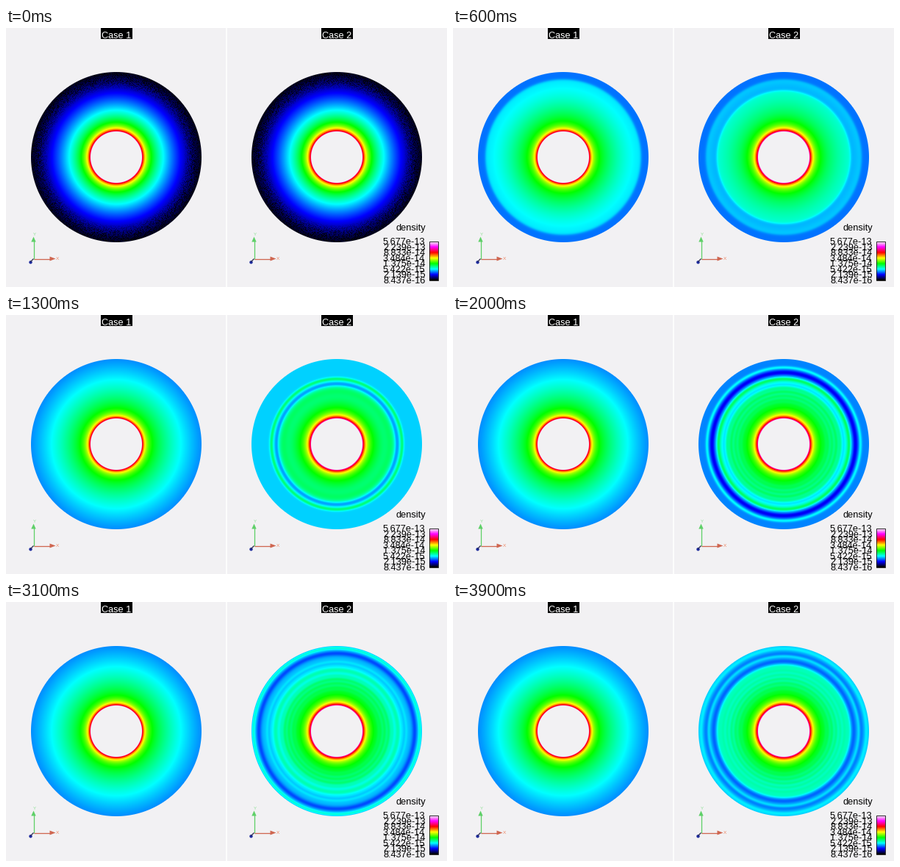
A matplotlib script that plays this animation: 600x353 px, repeating every 4000 ms.

```python
import numpy as np
import matplotlib.pyplot as plt
from matplotlib.animation import FuncAnimation
from matplotlib.patches import Circle, Polygon, Rectangle

W, H, DPI = 600, 353, 100
FRAMES, INTERVAL = 40, 100
R_IN, R_OUT, CY = 35, 116, 176
BG = np.array([242, 241, 243]) / 255

# Colour scale: black, blue, cyan, green, yellow, red, magenta, white
SCALE = np.array([[0, 0, 0], [0, 0, 1], [0, 1, 1], [0, 1, 0],
                  [1, 1, 0], [1, 0, 0], [1, 0, 1], [1, 1, 1]], float)

# Pulses of the second case: frame of passing PULSE_R, depth
PULSES = [(13, 0.6), (20, 0.4), (28.5, 0.2), (33, 0.35)]
PULSE_R, PULSE_SPEED = 82, 2.2


def colour(v):
    return np.stack([np.interp(v, range(8), SCALE[:, c]) for c in range(3)], -1)


def ramp(x, start, end):
    return np.clip((x - start) / (end - start), 0, 1)


def bump(r, centre, width):
    return np.exp(-((r - centre) / width) ** 2)


def inside(r, edge, width=1.0):
    return 1 / (1 + np.exp(np.clip((r - edge) / width, -50, 50)))


# Levels on the colour scale as functions of radius and frame
def power_law(r, rim, slope, peak, width=4.0):
    """Falls with log radius, plus a steep rise at the inner edge."""
    return (rim + slope * np.log(R_OUT / r)
            + peak * np.exp(-np.maximum(r - R_IN, 0) / width))


def steady_wind(r, t):
    return power_law(r, 1.55, 1.63, 2.0)


def pulsed_wind(r, t):
    wind = power_law(r, 1.55, 1.63, 2.3, 4.4) + 0.12 * ramp(r, 60, 88)
    rim = np.interp(t, [6, 13, 20, 39], [1.6, 1.82, 1.52, 1.65])
    v = rim + (wind - rim) * inside(r, 91)
    v += 0.07 * np.sin((r - 1.5 * t) * 1.1) * bump(r, 70, 14) * ramp(t, 13, 20)
    for passing, depth in PULSES:
        dip = PULSE_R + PULSE_SPEED * (t - passing)
        strength = depth * ramp(dip, 70, PULSE_R)
        v += strength * (0.4 * bump(r, dip - 9, 6) - bump(r, dip, 3.5)
                         + 0.8 * bump(r, dip + 7, 2.2))
    return v


def field(wind, r, t):
    """The wind sweeps outward through the initial state."""
    start = power_law(r, 0.1, 3.2, 1.6)
    ahead = start + (1.45 - start) * ramp(t, 0, 6)
    front = R_IN + 11.8 * t
    pile = 0.28 * ramp(t, 11, 5) * np.exp(-np.maximum(front - r, 0) / 15)
    return ahead + (wind(r, t) + pile - ahead) * inside(r, front) * (t > 0)


# Pixel grid around one disc
HALF = 120
axis = np.arange(-HALF, HALF) + 0.5
rad = np.hypot(*np.meshgrid(axis, axis))
cover = (np.clip(R_OUT - rad + 0.5, 0, 1)
         * np.clip(rad - R_IN + 0.5, 0, 1))[..., None]
speckle = np.random.default_rng(4).random(rad.shape) < 0.4
speckle = speckle * ramp(rad, 92, 106)


def disc(wind, t):
    v = field(wind, rad, t) * (1 - 0.75 * speckle * ramp(t, 3, 0))
    return colour(v) * cover + BG * (1 - cover)


fig = plt.figure(figsize=(W / DPI, H / DPI), dpi=DPI, facecolor=BG)
ax = fig.add_axes([0, 0, 1, 1])
ax.axis("off")


def px(n):
    return n * 72 / DPI


def text(x, y, s, size, color="black", **kw):
    ax.text(x, y, s, fontsize=px(size), color=color,
            family="Liberation Sans", **kw)


def line(xs, ys, color, width):
    ax.plot(xs, ys, color=color, lw=px(width), solid_capstyle="butt")


def triad(x, y):
    green, red = "#5fd068", "#cf6650"
    line([x, x], [y, y - 25], green, 1.3)
    ax.add_patch(Polygon([(x - 3.2, y - 23), (x + 3.2, y - 23), (x, y - 30)],
                         fc=green, lw=0))
    line([x, x + 23], [y, y], red, 1.3)
    ax.add_patch(Polygon([(x + 22, y - 3), (x + 22, y + 3), (x + 30, y)],
                         fc=red, lw=0))
    line([x, x - 4], [y, y + 4], "#303050", 1.3)
    ax.add_patch(Circle((x - 4, y + 4.8), 2.2, fc="#1c2a9c", lw=0))
    text(x + 1.5, y - 33, "Y", 6, "#8fe096", ha="center", va="center")
    text(x + 33, y, "X", 6.5, "#f08a68", ha="center", va="center")


WINDS = [steady_wind, pulsed_wind]
discs = []
for i, wind in enumerate(WINDS):
    cx = 150 + 300 * i
    extent = [cx - HALF, cx + HALF, CY + HALF, CY - HALF]
    discs.append(ax.imshow(disc(wind, 0), extent=extent,
                           interpolation="nearest"))
    ax.add_patch(Rectangle((cx - 21, 0), 43, 15, fc="black", lw=0))
    text(cx, 13.6, f"Case {i + 1}", 12.8, "white", ha="center")
    triad(cx - 112.5, 314.5)

line([300, 300], [0, H], "white", 1.6)

# Legend
ax.imshow(colour(np.linspace(7, 0, 106))[:, None], extent=[576, 588, 344, 291],
          interpolation="nearest")
ax.add_patch(Rectangle((576, 291), 12, 53, fill=False, ec="black", lw=px(0.8)))
text(530.6, 276, "density", 12.8)
for k, value in enumerate(np.geomspace(5.6767e-13, 8.437e-16, 8)):
    text(513, 295 + 7.57 * k, f"{value:.3e}", 12.8)

ax.set_aspect("auto")
ax.set_xlim(0, W)
ax.set_ylim(H, 0)


def update(frame):
    for im, wind in zip(discs, WINDS):
        im.set_data(disc(wind, frame))
    return discs


anim = FuncAnimation(fig, update, frames=FRAMES, interval=INTERVAL,
                     repeat=True, repeat_delay=0)
plt.show()
```
